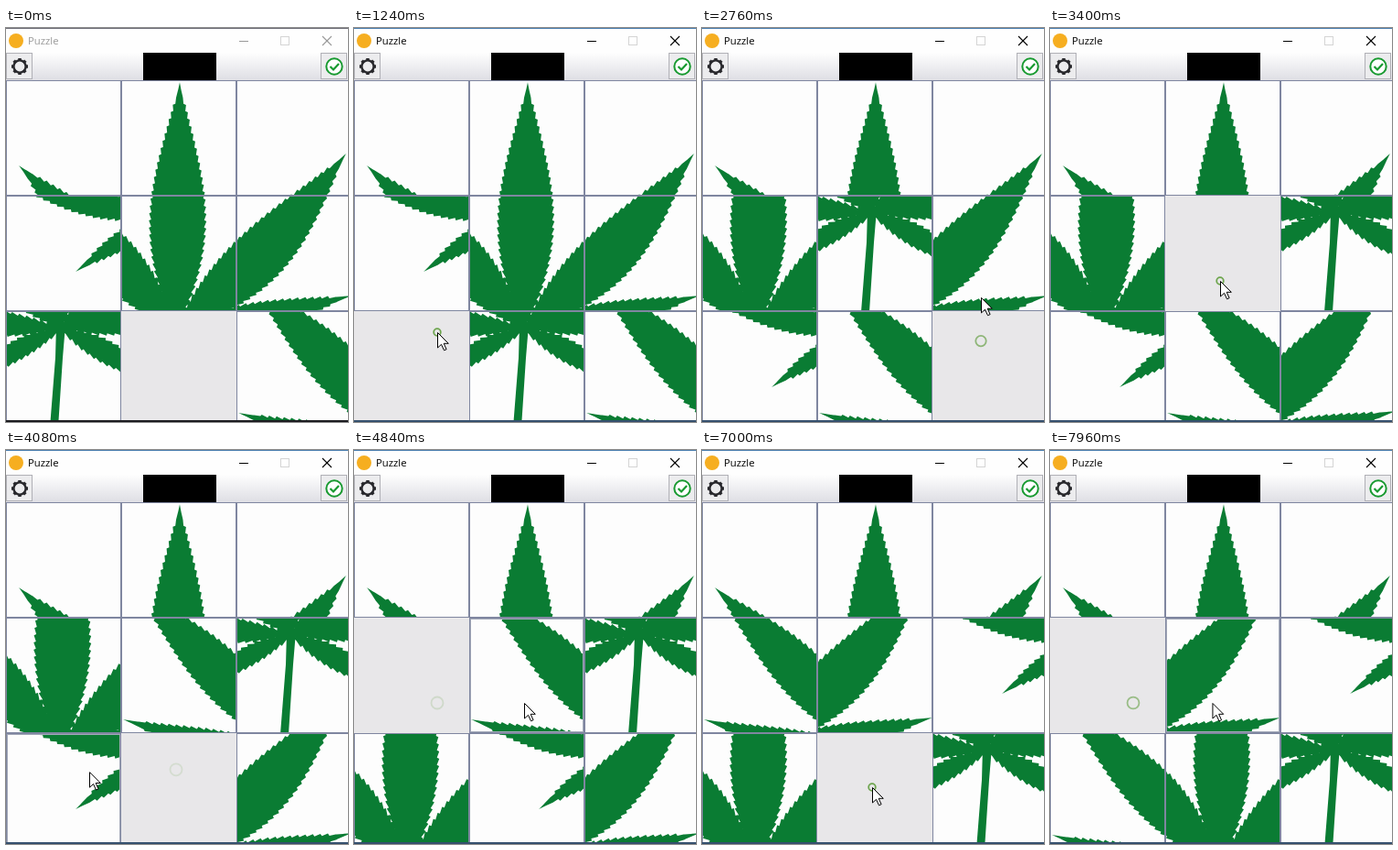
Write an HTML page with a canvas that moves like this. It is 374 by 430 pixels and loops after 8000 ms.

```html
<!DOCTYPE html>
<html lang="en">
<head>
<meta charset="utf-8">
<title>Puzzle</title>
<style>
  html, body { margin: 0; width: 374px; height: 430px; overflow: hidden; }
  canvas { display: block; }
</style>
</head>
<body>
<canvas id="stage" width="374" height="430"></canvas>
<script>
const ctx = document.getElementById('stage').getContext('2d');
const LOOP = 8000, CELL = 126, TOP = 57, BOTTOM = 428;
const FORM = '#e8e7e9', LINE = '#7f86a0', PAPER = '#fdfdfd', GREEN = '#0a7c33';
const HUB = { x: 186, y: 328 };
const COLUMN_X = [91, 186, 305];

// Home cells in reading order; 8 is the gap.
const START = '012645783';
// Clicked cells: a figure of eight round the lower two rows.
const ROUTE = '63478547';

const cellX = c => c % 3 * CELL;
const cellY = c => TOP + Math.floor(c / 3) * CELL;
const cellOf = i => +ROUTE[i % ROUTE.length];
const clickTime = i => 1200 + 384 * i - 150 * Math.sin(Math.PI * i / 15);

function clickPoint(i) {
  if (i < 0) return { x: 50, y: 450 };
  const cell = cellOf(i);
  return { x: COLUMN_X[cell % 3], y: cell > 5 ? 332 + 2.4 * i : 276 };
}

const picture = new Path2D();

// Saw-toothed leaflet from the hub to its tip; bend shifts its middle sideways.
function leaflet(tipX, tipY, halfWidth, bend) {
  const dx = tipX - HUB.x, dy = tipY - HUB.y, len = Math.hypot(dx, dy);
  const teeth = Math.round(len / 8), left = [], right = [];
  const add = (s, tooth) => {
    const w = halfWidth * Math.sin(Math.PI * s ** 0.82) ** 1.15;
    const edge = w > 4 ? w + tooth : w;
    const mid = bend * Math.sin(Math.PI * s);
    const at = off => [HUB.x + dx * s - dy / len * off, HUB.y + dy * s + dx / len * off];
    left.push(at(mid - edge));
    right.unshift(at(mid + edge));
  };
  for (let k = 0; k < teeth; k++) {
    add(k / teeth, -1);
    add((k + 0.85) / teeth, 1.5);
  }
  const shape = new Path2D();
  for (const p of [...left, [tipX, tipY], ...right]) shape.lineTo(...p);
  shape.closePath();
  picture.addPath(shape);
}

leaflet(190, 59, 30, 0);
leaflet(14, 150, 26.5, 3);
leaflet(372, 137, 29, 10);
leaflet(2, 294, 13.5, -7);
leaflet(378, 292, 15.5, 4);
leaflet(76, 392, 10.5, 4);
leaflet(300, 392, 12, -2);
picture.addPath(new Path2D('M181 324L191 324L188 360L183 436L174 436L180 360Z'));

const arrow = new Path2D('M0 0V16.5L4 12.8L7 19.3L9.6 18.2L6.7 11.8H11.8Z');

function box(x, y, w, h, color) {
  ctx.fillStyle = color;
  ctx.fillRect(x, y, w, h);
}

function frame(x, y, w, h, color, width = 1) {
  ctx.strokeStyle = color;
  ctx.lineWidth = width;
  ctx.strokeRect(x + width / 2, y + width / 2, w - width, h - width);
}

function disc(x, y, r, color) {
  ctx.fillStyle = color;
  ctx.beginPath();
  ctx.arc(x, y, r, 0, 7);
  ctx.fill();
}

function circle(x, y, r, color, width) {
  ctx.strokeStyle = color;
  ctx.lineWidth = width;
  ctx.beginPath();
  ctx.arc(x, y, r, 0, 7);
  ctx.stroke();
}

function line(color, width, ...p) {
  ctx.strokeStyle = color;
  ctx.lineWidth = width;
  ctx.beginPath();
  for (let i = 0; i < p.length; i += 2) ctx.lineTo(p[i], p[i + 1]);
  ctx.stroke();
}

function drawTitleBar(active) {
  const ink = active ? '#000' : '#999';
  box(0, 0, 374, 27, '#fefefe');
  box(0, 0, 374, 1, active ? '#4c80b0' : '#70707a');
  disc(11, 14, 8, '#f6ae20');
  ctx.fillStyle = ink;
  ctx.font = '11.3px "Open Sans", "Noto Sans", sans-serif';
  ctx.fillText('Puzzle', 24, 18);
  line(ink, 1, 255, 14.5, 265, 14.5);
  frame(300, 9, 10, 10, '#d4d4d4');
  line(ink, 1.1, 346, 9, 356, 19);
  line(ink, 1.1, 356, 9, 346, 19);
}

function drawToolbar() {
  const shade = ctx.createLinearGradient(0, 27, 0, 57);
  shade.addColorStop(0, '#fefefe');
  shade.addColorStop(1, '#dedee4');
  box(0, 27, 374, 30, shade);
  for (const x of [0, 344]) {
    box(x, 27, 29, 29, '#ececee');
    frame(x, 27, 29, 29, '#b0b0b6');
  }
  for (let i = 0; i < 8; i++) {
    const c = Math.cos(i * Math.PI / 4), s = Math.sin(i * Math.PI / 4);
    line('#28282c', 3.5, 15 + c * 6, 42 + s * 6, 15 + c * 9, 42 + s * 9);
  }
  circle(15, 42, 6.6, '#28282c', 2.4);
  disc(359, 42, 9, '#fff');
  circle(359, 42, 8.7, '#189a30', 2);
  line('#189a30', 2.2, 354.5, 42, 358, 45.5, 364, 39);
  box(150, 27, 80, 30, '#000');
}

function drawTile(home, cell, hover) {
  const x = cellX(cell), y = cellY(cell);
  ctx.save();
  ctx.beginPath();
  ctx.rect(x, y, CELL, CELL);
  ctx.clip();
  box(x, y, CELL, CELL, PAPER);
  ctx.save();
  ctx.translate(x - cellX(home), y - cellY(home));
  ctx.fillStyle = GREEN;
  ctx.fill(picture);
  ctx.restore();
  if (hover) frame(x + 1, y + 1, CELL - 2, CELL - 2, '#a2a8b8');
  frame(x, y, CELL, CELL, LINE);
  ctx.restore();
}

function boardAfter(clicks) {
  const board = [...START].map(Number);
  for (let i = 0; i < clicks; i++) {
    const from = cellOf(i), gap = board.indexOf(8);
    [board[from], board[gap]] = [8, board[from]];
  }
  return board;
}

function drawPointer(last, age) {
  if (last >= 0 && age < 400) {
    const { x, y } = clickPoint(last);
    ctx.globalAlpha = 1 - age / 400;
    circle(x, y, Math.min(6.5, 3 + age * 0.02), '#5f9d3c', 1.8);
    ctx.globalAlpha = 1;
  }
  const a = clickPoint(last), b = clickPoint(last + 1);
  const p = Math.min(1, Math.max(0, (age - 60) / 160));
  const ease = 1 - (1 - p) ** 2;
  ctx.save();
  ctx.translate(a.x + (b.x - a.x) * ease + 0.5, a.y + (b.y - a.y) * ease + 0.5);
  ctx.fillStyle = '#fff';
  ctx.fill(arrow);
  ctx.strokeStyle = '#000';
  ctx.lineWidth = 1;
  ctx.stroke(arrow);
  ctx.restore();
}

function draw(t) {
  let next = 0;
  while (clickTime(next) <= t) next++;
  const age = t - clickTime(next - 1);
  const active = t >= 1140;

  drawTitleBar(active);
  drawToolbar();
  box(0, TOP, 374, BOTTOM - TOP, FORM);
  boardAfter(next).forEach((home, cell) => {
    if (home !== 8) drawTile(home, cell, age > 160 && cell === cellOf(next));
  });
  box(0, BOTTOM, 374, 2, active ? '#35506e' : '#1c1c20');
  if (age >= 0) drawPointer(next - 1, age);
}

function tick() {
  draw(performance.now() % LOOP);
  requestAnimationFrame(tick);
}
tick();
</script>
</body>
</html>
```
